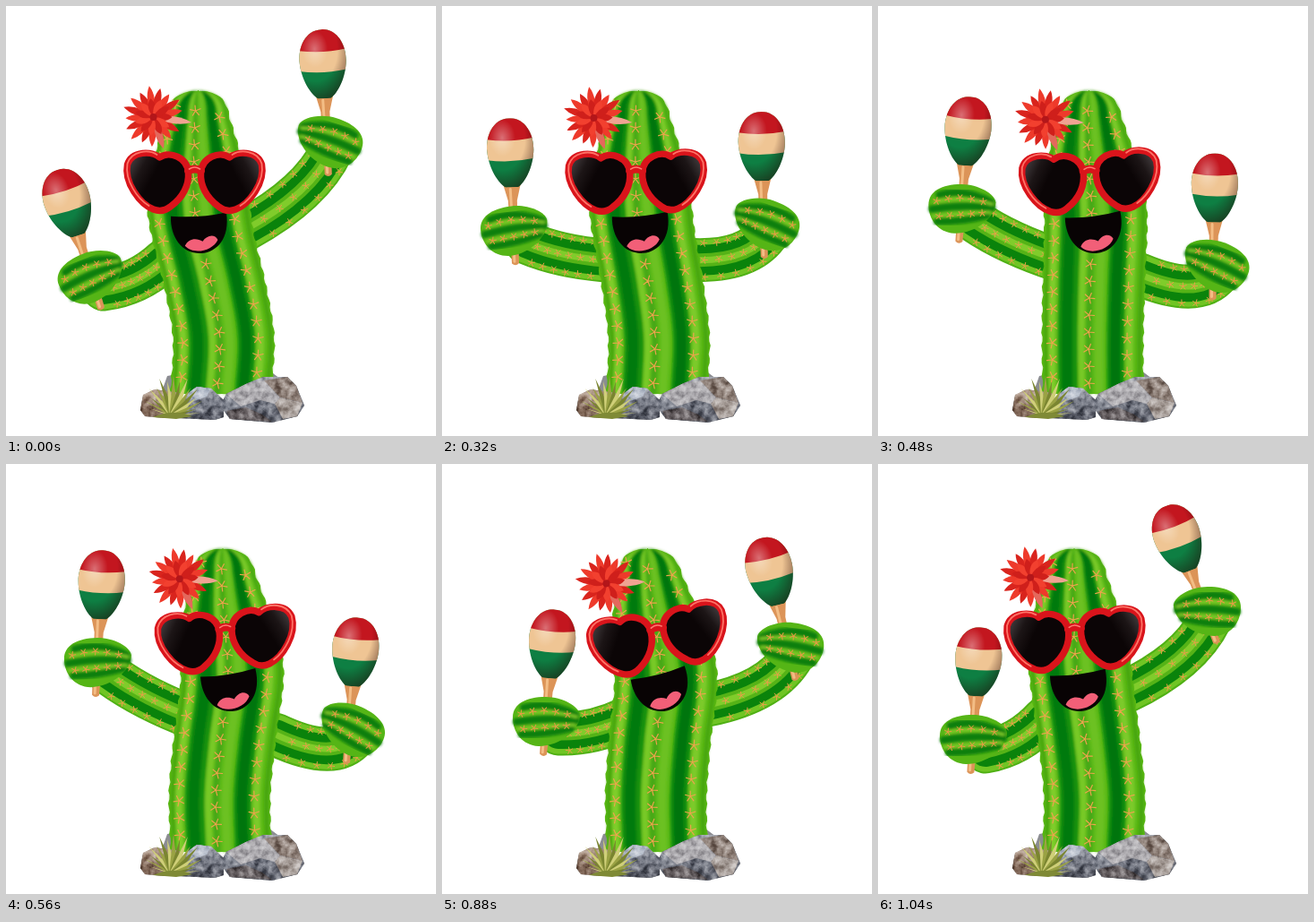
Write an HTML page that moves like this. It is 480 px wide and 480 px high and loops after 1.12 s.

```html
<!DOCTYPE html>
<html lang="en">
<head>
<meta charset="utf-8">
<title>Dancing cactus</title>
<style>
  html, body { margin: 0; width: 100%; height: 100%; overflow: hidden; background: #fff; }
  svg { display: block; width: 100%; height: 100%; }
  path { stroke-linecap: round; stroke-linejoin: round; }
  .line { fill: none; }
</style>
</head>
<body>
<svg viewBox="0 0 480 480">
  <defs>
    <filter id="soft" x="-10%" y="-10%" width="120%" height="120%"><feGaussianBlur stdDeviation="1.6"/></filter>
    <filter id="grain" x="0" y="0" width="100%" height="100%" color-interpolation-filters="sRGB">
      <feTurbulence type="fractalNoise" baseFrequency=".13" numOctaves="4" seed="4"/>
      <feColorMatrix values="1.6 0 0 0 -.3  1.6 0 0 0 -.3  1.6 0 0 0 -.3  0 0 0 0 1"/>
      <feComposite in2="SourceAlpha" operator="in"/>
      <feBlend in2="SourceGraphic" mode="soft-light"/>
    </filter>
    <linearGradient id="lensFill" x1="0" y1="0" x2="1" y2=".5">
      <stop offset="0" stop-color="#555052"/><stop offset=".3" stop-color="#1c1516"/><stop offset=".5" stop-color="#0b0506"/>
    </linearGradient>
    <radialGradient id="gloss" cx=".36" cy=".3" r=".7">
      <stop offset="0" stop-color="#fff" stop-opacity=".38"/><stop offset=".35" stop-color="#fff" stop-opacity="0"/>
      <stop offset=".6" stop-color="#200" stop-opacity="0"/><stop offset="1" stop-color="#200" stop-opacity=".5"/>
    </radialGradient>
    <linearGradient id="rock" x1="0" y1="0" x2=".3" y2="1">
      <stop offset="0" stop-color="#b4b6bd"/><stop offset=".5" stop-color="#858994"/><stop offset="1" stop-color="#5d606b"/>
    </linearGradient>
    <linearGradient id="sand" x1="0" y1="0" x2="0" y2="1">
      <stop offset="0" stop-color="#b39c8c"/><stop offset="1" stop-color="#745a4b"/>
    </linearGradient>
    <clipPath id="egg"><path d="M0-41C18-41 27-22 26-5C25 14 15 31 7 36H-7C-15 31-25 14-26-5C-27-22-18-41 0-41Z"/></clipPath>

    <g id="maraca" transform="translate(0 -84)">
      <path d="M-11 28L-5 51L-4 121Q0 125 4 121L5 51L11 28Z" fill="#dc9458"/>
      <path class="line" d="M-2 38L-1 119" stroke="#f3bd85" stroke-width="3"/>
      <g clip-path="url(#egg)">
        <path d="M-30-45H30V40H-30Z" fill="#0e7f43"/>
        <path d="M-30-45H30V4Q0 10-30 4Z" fill="#efc594"/>
        <path d="M-30-45H30V-19Q0-13-30-19Z" fill="#c3161f"/>
        <path d="M-30-45H30V40H-30Z" fill="url(#gloss)"/>
      </g>
    </g>

    <g id="fist">
      <path d="M-37-4C-37-19-22-27 0-27C18-27 37-17 38-7C38 9 17 28-8 28C-26 27-37 13-37-4Z" fill="#55b516"/>
      <g class="line" filter="url(#soft)">
        <path d="M33-7Q4-23-25-15M34-1Q0-5-33 1M28 8Q2 15-27 15" stroke="#087f09" stroke-width="8"/>
        <path d="M34-5Q0-15-30-7M31 4Q0 6-31 9" stroke="#85cd2b" stroke-width="3"/>
      </g>
      <path class="line fistSpines" stroke="#e89a45"/>
    </g>

    <g id="lens">
      <path d="M-39-17C-47-24-70-25-75-9C-79 11-61 35-46 41C-38 44-32 42-27 38C-13 28-6 14-7 0C-8-17-28-25-39-17Z" fill="url(#lensFill)" stroke="#d9141b" stroke-width="7.5"/>
      <path class="line" d="M-42-20C-51-26-70-25-75-10C-78 9-64 29-51 37" stroke="#ff7468" stroke-width="1.8"/>
    </g>
  </defs>

  <g id="arms"></g>
  <path d="M174 430L180 413L196 410L207 432ZM278 425L294 407L306 416V430Z" fill="#8c8d92"/>
  <path id="outline" fill="#5ab916"/>
  <g id="stripes" filter="url(#soft)"></g>
  <path id="spines" class="line" stroke="#eda34c" stroke-width="1.2"/>

  <g id="mouth">
    <path d="M-31-20Q0-16 31-21C34 8 18 23 1 23C-20 23-33 4-31-20Z" fill="#080304"/>
    <path d="M-17 14C-12 5-3 6 3 10C8 3 17 2 20 9C14 21-8 25-17 14Z" fill="#f25f78"/>
  </g>
  <g id="head">
    <g id="flower" transform="translate(-46 -62)"></g>
    <use href="#lens"/>
    <use href="#lens" transform="scale(-1 1)"/>
    <path class="line" d="M-7-2Q0-6 7-2" stroke="#d9141b" stroke-width="9"/>
    <path class="line" d="M-6-4Q0-8 6-4" stroke="#ff7a70" stroke-width="1.6"/>
  </g>

  <g filter="url(#grain)">
    <path d="M150 451L153 434L166 428L194 432L202 456L177 460L155 458Z" fill="url(#sand)"/>
    <path d="M192 460L201 434L213 425L229 427L243 440V459L233 462Z" fill="url(#rock)"/>
    <path d="M201 434L213 425L229 427L224 436L210 441Z" fill="#aeb6c4"/>
    <path d="M239 446L246 433L270 421L287 414L314 414L324 424L333 446L325 458L297 465L250 461Z" fill="url(#rock)"/>
    <path d="M246 433L270 421L288 418L306 437L300 444L284 440L262 447Z" fill="#b0aeb2"/>
    <path d="M288 418L314 414L324 424L331 443L306 437Z" fill="#93857d"/>
    <path d="M300 444L306 437L331 443L325 458L309 461Z" fill="#aba29d"/>
    <path d="M246 452L268 448L286 456L297 464L250 461Z" fill="#655e60"/>
  </g>
  <g id="plant"></g>
</svg>

<script>
const LOOP = 1120, STEP = 80;
const times = [0, 160, 400, 560, 720, 880, 1040];
// Key poses: face position and tilt, then position and tilt of each hand.
const tracks = {
  face: [210.5, 201, 226.5, 245, 253.5, 240, 219.5],
  tilt: [0, 0, -2, -5, -11, -10.5, -3.2],
  leftX: [95, 75, 86, 102, 118, 116, 106],
  leftY: [302, 277, 238, 221, 251, 287, 307],
  leftTilt: [-17.5, -18, 4, 3, 3.5, 4.5, 4],
  rightX: [361, 352, 369, 386, 401, 389, 368],
  rightY: [151, 184, 270, 296, 256, 204, 164],
  rightTilt: [-2.8, 3.3, -2.8, 4.6, -4.6, -13.3, -20.4]
};

const $ = id => document.getElementById(id);
const range = n => [...Array(n).keys()];
const fix = n => n.toFixed(1);

function add(parent, tag, attributes) {
  const node = document.createElementNS('http://www.w3.org/2000/svg', tag);
  for (const key in attributes) node.setAttribute(key, attributes[key]);
  return parent.appendChild(node);
}

// Smooth curve through the points (xs, ys).
function spline(xs, ys, x) {
  const last = xs.length - 1;
  let i = 0;
  while (i < last - 1 && xs[i + 1] <= x) i++;
  const slope = j => {
    const a = Math.max(j - 1, 0), b = Math.min(j + 1, last);
    return (ys[b] - ys[a]) / (xs[b] - xs[a]);
  };
  const h = xs[i + 1] - xs[i], s = (x - xs[i]) / h, q = 1 - s;
  return q * q * (1 + 2 * s) * ys[i] + s * s * (3 - 2 * s) * ys[i + 1]
    + s * q * h * (q * slope(i) - s * slope(i + 1));
}

const wrap = (values, shift) => [values.at(-1) - shift, ...values, values[0] + shift, values[1] + shift];
const loopTimes = wrap(times, LOOP);

function poseAt(time) {
  const pose = {};
  for (const key in tracks) pose[key] = spline(loopTimes, wrap(tracks[key], 0), time);
  return pose;
}

const spine = (x, y, size) => range(5).map(i => {
  const a = i * 1.257 + x * .02 + .4;
  return `M${fix(x)} ${fix(y)}l${fix(size * Math.cos(a))} ${fix(size * Math.sin(a))}`;
}).join('');

// Body: each stripe runs between two relative positions across the trunk.
const TOP = 94, BOTTOM = 433;
const rows = range(86).map(i => TOP + (BOTTOM - TOP) * (i / 85) ** 1.25);

function halfWidth(y) {
  if (y < 120) return 34 * Math.sqrt(1 - ((120 - y) / 26) ** 2);
  if (y < 235) return 34 + 23.5 * Math.sin(Math.PI / 2 * (y - 120) / 115);
  return 57.5 - (y - 235) / 150;
}

function trunk({ face, tilt }) {
  const chest = face + 5.5 - .4 * tilt, lean = chest - 240;
  const xs = [face + 4 + 1.4 * tilt, face + 3.5 + .7 * tilt, chest, 240 + .3 * lean, 240 - .12 * lean, 240];
  return (u, y) => spline([94, 150, 235, 310, 370, 430], xs, y) + u * halfWidth(y);
}

function band(at, from, to, bump = 0) {
  const edge = (u, y) => `${fix(at(u, y) + Math.sign(u) * bump * Math.sin(y / 2.6))} ${fix(y)}`;
  const down = rows.map(y => edge(from, y)), up = rows.map(y => edge(to, y)).reverse();
  return 'M' + [...down, ...up].join('L') + 'Z';
}

const stripes = [
  [-.97, -.88, '#49a810'], [-.87, -.74, '#7fcd2a'], [-.68, -.3, '#129110'], [-.62, -.4, '#057a08'],
  [-.28, -.16, '#78c927'], [-.13, -.02, '#47a813'], [.04, .2, '#6cc122'],
  [.28, .62, '#0f8c0e'], [.35, .54, '#057407'], [.66, .8, '#7bca29'], [.88, .97, '#47a610']
].map(([from, to, fill]) => ({ from, to, node: add($('stripes'), 'path', { fill }) }));

function drawBody(pose) {
  const at = trunk(pose);
  $('outline').setAttribute('d', band(at, -1, 1, 1));
  for (const { from, to, node } of stripes) node.setAttribute('d', band(at, from, to));
  let d = '';
  [-.8, -.08, .68].forEach((u, column) => {
    for (let y = 110 + column * 7; y < 425; y += 19) d += spine(at(u, y), y, 6);
  });
  $('spines').setAttribute('d', d);
}

// An arm is a curved tube, with the maraca and the fist at its end.
function makeArm(side) {
  const group = add($('arms'), 'g');
  const tube = add(group, 'g', { class: 'line' });
  const layers = [[49, '#4fb014'], [45, '#70c524'], [34, '#0a830b'], [15, '#55b317'], [7, '#80cc2b']]
    .map(([width, stroke]) => add(tube, 'path', { 'stroke-width': width, stroke }));
  const spines = add(group, 'path', { class: 'line', stroke: '#e89f48' });
  const maraca = add(group, 'use', { href: '#maraca' });
  const fist = add(group, 'use', { href: '#fist' });

  return (x, y, tilt, shoulder) => {
    const end = side < 0 ? [x + 14, y + 14] : [x + 3, y + 9];
    const elbow = side < 0 ? [x + 52, 130 + .6 * y] : [x - 20, 81 + .85 * y];
    const d = `M${shoulder}Q${elbow} ${end}`;
    layers.forEach(layer => layer.setAttribute('d', d));

    let dots = '';
    for (let t = .15; t < .9; t += .14) {
      const q = 1 - t;
      const [px, py] = [0, 1].map(i => q * q * shoulder[i] + 2 * q * t * elbow[i] + t * t * end[i]);
      const [dx, dy] = [0, 1].map(i => q * (elbow[i] - shoulder[i]) + t * (end[i] - elbow[i]));
      const length = Math.hypot(dx, dy);
      for (const k of [-19, 0, 19]) dots += spine(px - k * dy / length, py + k * dx / length, 4);
    }
    spines.setAttribute('d', dots);
    maraca.setAttribute('transform', `translate(${x - (side > 0 ? 3 : 0)} ${y}) rotate(${tilt})`);
    fist.setAttribute('transform', side < 0
      ? `translate(${x} ${y}) rotate(${tilt - 4})`
      : `translate(${x} ${y}) rotate(${tilt + 20}) scale(-1 1)`);
  };
}

function drawScenery() {
  document.querySelector('.fistSpines').setAttribute('d',
    range(5).map(i => spine(-28 + i * 13, -8 - 4 * Math.sin(i * .8), 4) + spine(-25 + i * 12, 9 - i, 4)).join(''));

  const flower = $('flower');
  const petal = (angle, length, fill) => add(flower, 'path', {
    d: `M0 0Q${length * .6}-8 ${length} 0Q${length * .6} 8 0 0Z`, fill, transform: `rotate(${angle})`
  });
  range(17).forEach(i => petal(i * 21.2 + 8, 35 - (i % 3) * 2, i % 2 ? '#d9241d' : '#ee3a2b'));
  petal(8, 43, '#f0a392');
  petal(72, 37, '#e4685c');
  range(11).forEach(i => petal(i * 32.7, 21, i % 2 ? '#f2402f' : '#cf1f1b'));
  add(flower, 'circle', { r: 4, fill: '#b3161a' });

  range(17).forEach(i => {
    const a = Math.PI * (1.02 + i * .06), r = 30 + 14 * Math.sin(i * Math.PI / 16) - (i % 2) * 6;
    add($('plant'), 'path', {
      d: `M182 457L${fix(187 + r * Math.cos(a))} ${fix(456 + r * Math.sin(a))}L192 458Z`,
      fill: ['#7a8530', '#cfcf78', '#9aa244'][i % 3]
    });
  });
  add($('plant'), 'path', { d: 'M164 459Q187 449 208 458L190 461Z', fill: '#7f8a36' });
}

const leftArm = makeArm(-1), rightArm = makeArm(1);
drawScenery();

function draw(time) {
  const pose = poseAt(Math.floor(time % LOOP / STEP) * STEP);
  const { face, tilt, leftX, leftY, leftTilt, rightX, rightY, rightTilt } = pose;
  drawBody(pose);
  leftArm(leftX, leftY, leftTilt, [face - 34, 284]);
  rightArm(rightX, rightY, rightTilt, [face + 56, 250 + .36 * (rightY - 151)]);
  $('head').setAttribute('transform', `translate(${face} 186) rotate(${tilt})`);
  $('mouth').setAttribute('transform', `translate(${face + 5.5} 253) rotate(${tilt - 3})`);
}

function tick(now) {
  draw(now);
  requestAnimationFrame(tick);
}
draw(0);
requestAnimationFrame(tick);
</script>
</body>
</html>
```
